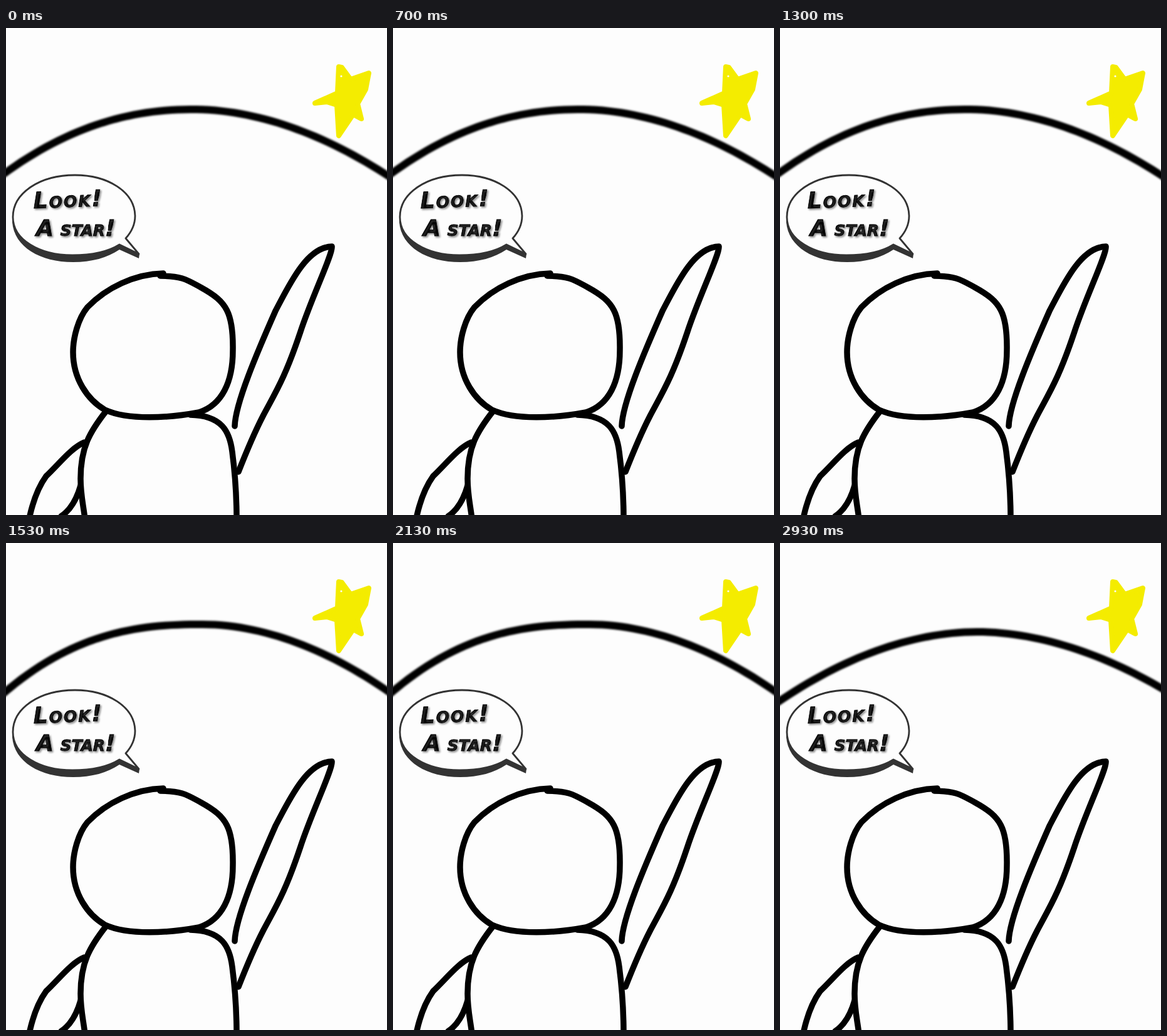
An HTML page that plays this animation: 608x778 px, repeating every 3010 ms.

```html
<!DOCTYPE html>
<html lang="en">
<head>
<meta charset="utf-8">
<title>Look! A star!</title>
<style>
  html, body { margin: 0; width: 100%; height: 100%; overflow: hidden; background: #fdfdfd; }
  svg { display: block; width: 100%; height: 100%; }
  .ink { fill: none; stroke: #000; stroke-width: 9.5; stroke-linecap: round; stroke-linejoin: round; }
  text { font: italic 700 36px "DejaVu Sans", sans-serif; font-variant: small-caps;
         fill: #000; stroke: #000; stroke-width: .8; text-shadow: 2px 2px 3px #888; }
</style>
</head>
<body>
<svg viewBox="0 0 608 778">
  <defs>
    <filter id="soft" filterUnits="userSpaceOnUse" x="-20" y="90" width="650" height="200">
      <feGaussianBlur stdDeviation="1.7"/>
    </filter>
  </defs>

  <path fill="#f4ec00" stroke="#f4ec00" stroke-width="8" stroke-linejoin="round"
    d="M531 62L536 63L550 82L579 72L574 98L561 121L567 145L554 138L531 172L528 123L512 118L493 120L529 104Z"/>
  <circle cx="535" cy="77" r="1.6" fill="#fdfdfd"/>

  <path id="horizon" filter="url(#soft)" fill="none" stroke="#000" stroke-width="12"/>

  <path fill="#333" d="M10 302V310C13 350 55 374 107 374C137 374 162 367 181 354L212 368L213 361L180 345L106 361Z"/>
  <path fill="#fdfdfd" stroke="#333" stroke-width="2.8" stroke-linejoin="round"
    d="M191 336C201 325 206 314 206 300C205 261 162 235 110 235C53 235 11 264 11 302
       C11 338 53 363 106 363C135 363 162 358 181 346L212 361Z"/>
  <text x="44" y="288" letter-spacing="2" transform="rotate(-2 44 288)">Look!</text>
  <text x="48" y="332" word-spacing="-2">A star!</text>

  <g class="ink">
    <!-- head -->
    <path d="M251 392C205 393 160 415 130 446C115 464 107 495 107 518C107 560 130 594 158 610
             C195 627 260 623 308 614C345 602 362 565 362 515C363 455 352 437 312 415C290 403 282 396 246 396"/>
    <!-- body -->
    <path d="M159 613C134 645 119 670 119 720C119 745 123 760 126 784"/>
    <path d="M294 618C345 619 357 645 361 677C366 715 368 745 368 784"/>
    <!-- lowered arm -->
    <path d="M125 662C105 670 85 696 64 716Q46 741 37 784M119 731Q109 766 88 780"/>
    <!-- raised arm -->
    <path d="M365 636C366 600 400 520 430 452C452 410 480 350 520 349C522 360 488 430 470 485
             C445 560 430 582 410 620Q393 653 371 709"/>
  </g>
</svg>
<script>
  const LOOP = 3010, STEP = 100 / 3, LAST_STEP = 88, HOLD = 120;
  const LEFT = -6, RIGHT = 614, RIGHT_BEND = 1.9;

  // Each redrawn arch: its crest, the height at both ends, and how sharply its left side bends.
  const arches = [
    { x: 300, y: 130, left: 235, right: 239, bend: 2.15 },
    { x: 310, y: 141, left: 246, right: 233, bend: 2.45 },
    { x: 315, y: 130, left: 242, right: 240, bend: 2.5 },
    { x: 292, y: 131, left: 228, right: 240, bend: 2.08 },
    { x: 315, y: 142, left: 256, right: 235, bend: 1.93 }
  ];

  function archHeight(arch, x) {
    const onLeft = x < arch.x;
    const reach = (x - arch.x) / ((onLeft ? LEFT : RIGHT) - arch.x);
    const drop = (onLeft ? arch.left : arch.right) - arch.y;
    return arch.y + drop * reach ** (onLeft ? arch.bend : RIGHT_BEND);
  }

  function archPath(arch) {
    const points = [];
    for (let x = LEFT; x <= RIGHT; x += 10) points.push(`${x},${archHeight(arch, x).toFixed(2)}`);
    return "M" + points.join("L");
  }

  const drawings = arches.map(archPath);
  const horizon = document.getElementById("horizon");

  function render(time) {
    const step = Math.min(LAST_STEP, Math.floor((time % LOOP + 7) / STEP));
    horizon.setAttribute("d", drawings[Math.floor(step * STEP / HOLD) % drawings.length]);
  }

  const start = performance.now();
  function tick() {
    render(performance.now() - start);
    requestAnimationFrame(tick);
  }
  render(0);
  requestAnimationFrame(tick);
</script>
</body>
</html>
```
